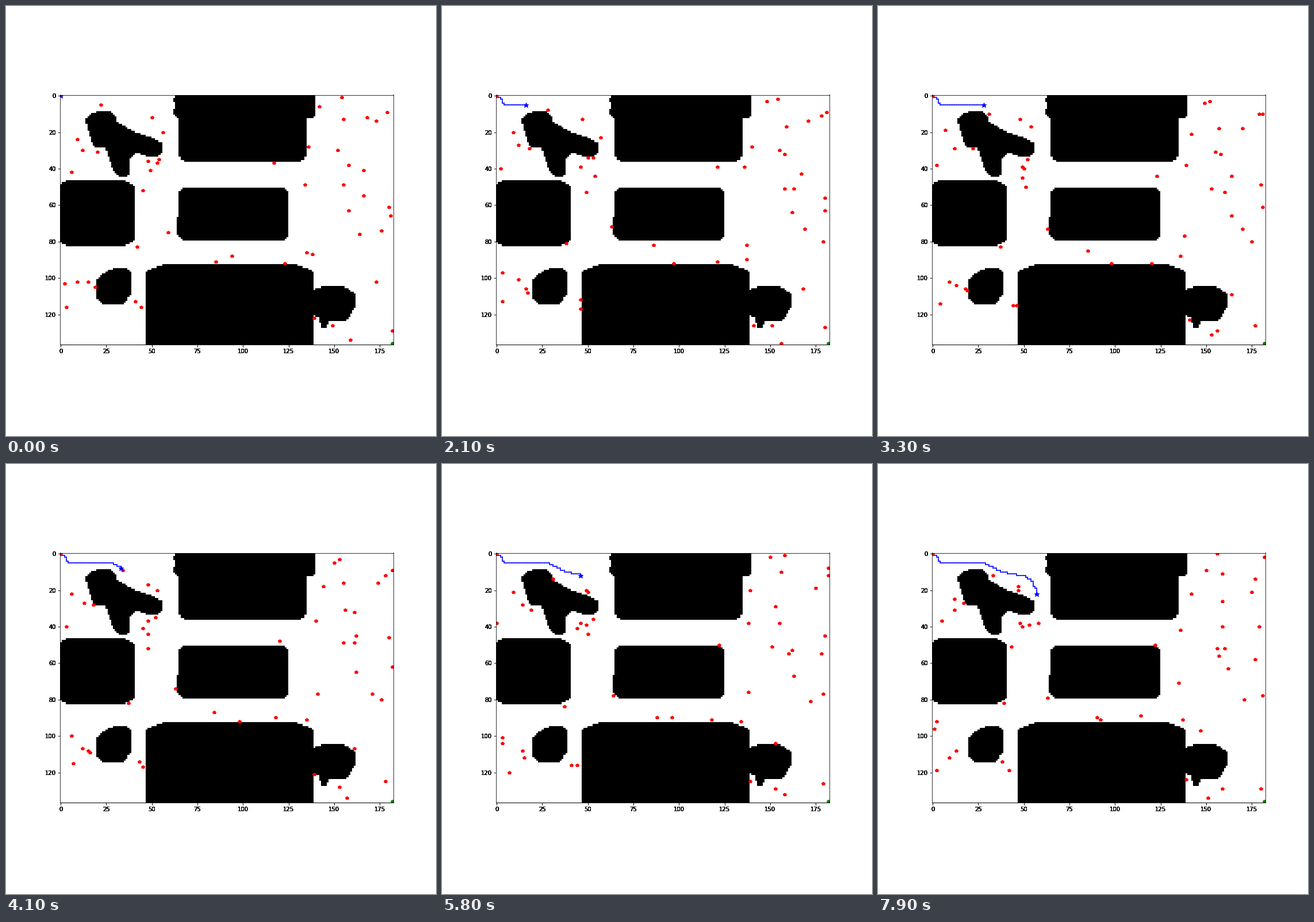
A matplotlib script that plays this animation: 748x748 px, repeating every 8000 ms.

```python
import numpy as np
import matplotlib.pyplot as plt
from matplotlib.animation import FuncAnimation
from matplotlib.path import Path

SIZE, DPI = 748, 72
COLS, ROWS = 183, 137
FRAMES, STEP_MS = 80, 100
BOX = np.array([93.6, 159.05, 580.32, 434.45]) / SIZE

# Rounded rooms: x0, y0, x1, y1, then the corner's width and height
ROOMS = [(63, -9, 140, 13, 2, 1), (65, -9, 135, 37, 4, 4),
         (62, 2, 63, 4), (62, 8, 63, 11),
         (-2, 47, 41, 83, 8, 4),
         (65, 51, 125, 80, 3, 3), (64, 67, 65, 77),
         (47, 93, 139, 145, 13, 5)]

# Irregular obstacles as outlines
PLANE = [(17, 10), (23, 9), (28, 9), (31, 13), (31, 15), (40, 20), (50, 23.5),
         (56, 26.5), (56, 31), (54, 34), (48, 34), (43, 32), (41, 32), (38, 35),
         (38, 43), (36, 45), (32, 45), (29, 41.5), (25, 29), (19, 29), (17, 25),
         (14, 14)]
DRUM = [(20, 102), (24, 98), (27, 96), (32, 95), (37, 95), (39, 98), (39, 109),
        (35, 115), (24, 115), (20, 111)]
BLOB = [(138, 107), (145, 105), (155, 105), (162, 109), (162, 116), (157, 124),
        (147, 124), (146, 128), (143, 128), (142, 122), (138, 121)]

# Cells where the walkers begin
STARTS = [(22, 5), (50, 12), (56, 20), (9, 24), (12, 30), (20, 31), (6, 42),
          (48, 36), (53, 37), (54, 35), (49, 41), (45, 52), (59, 75), (42, 83),
          (2, 103), (9, 102), (15, 102), (19, 105), (3, 116), (41, 113),
          (44, 116), (85, 91), (94, 88), (123, 92), (117, 37), (142, 6),
          (154, 1), (155, 13), (168, 12), (173, 14), (179, 9), (136, 28),
          (152, 30), (158, 38), (166, 41), (134, 49), (155, 49), (166, 55),
          (158, 63), (164, 76), (180, 61), (181, 66), (176, 74), (135, 86),
          (138, 87), (173, 102), (139, 122), (149, 126), (159, 134), (182, 129)]

# The robot's route: lengths of its runs, in turn down and right
RUNS = ([1, 2, 1, 1, 2, 1, 1, 25] + 4 * [1, 2]
        + [1, 4, 1, 5, 1, 5, 1, 1, 1, 2, 1, 1, 3, 1, 1, 1, 3])


def room(x, y, x0, y0, x1, y1, rx=0.5, ry=0.5):
    dx = np.maximum(0, np.maximum(x0 + rx - x, x - x1 + rx)) / rx
    dy = np.maximum(0, np.maximum(y0 + ry - y, y - y1 + ry)) / ry
    return dx ** 1.5 + dy ** 1.5 <= 1


def build_map():
    x, y = np.meshgrid(np.arange(COLS) + 0.5, np.arange(ROWS) + 0.5)
    blocked = np.zeros((ROWS, COLS), bool)
    for shape in ROOMS:
        blocked |= room(x, y, *shape)
    centres = np.column_stack([x.ravel(), y.ravel()])
    for outline in (PLANE, DRUM, BLOB):
        inside = Path(outline + outline[:1]).contains_points(centres)
        blocked |= inside.reshape(ROWS, COLS)
    return blocked


def wander(starts, blocked, rng):
    """Each walker steps to a random neighbouring cell, if that is free."""
    track = [np.array(starts)]
    for _ in range(FRAMES - 1):
        here = track[-1]
        there = here + rng.integers(-1, 2, here.shape)
        there = np.clip(there, 0, (COLS - 1, ROWS - 1))
        wall = blocked[there[:, 1], there[:, 0]]
        track.append(np.where(wall[:, None], here, there))
    return np.array(track)


def follow(runs):
    steps = [(i % 2, 1 - i % 2) for i, n in enumerate(runs) for _ in range(n)]
    return np.cumsum([(0, 0)] + steps, axis=0)


blocked = build_map()
tracks = wander(STARTS, blocked, np.random.default_rng(7))
route = follow(RUNS)

fig = plt.figure(figsize=(SIZE / DPI, SIZE / DPI), dpi=DPI, facecolor="white")


def add_axes():
    ax = fig.add_axes(BOX, facecolor="none")
    ax.set(xlim=(-0.5, COLS - 0.5), ylim=(ROWS - 0.5, -0.5),
           xticks=range(0, 176, 25), yticks=range(0, 121, 20))
    return ax


# Stacked axes give the tick labels their heavy look
for _ in range(6):
    add_axes()
ax = add_axes()
ax.imshow(~blocked, cmap="gray", vmin=0, vmax=1, aspect="auto",
          interpolation="nearest")

# Separate segments, so that their caps overlap at every cell
trail = [ax.plot(*route[i:i + 2].T, color="blue", lw=1.5)[0]
         for i in range(len(route) - 1)]
ax.plot(0, 0, "p", color="red")
ax.plot(COLS - 1, ROWS - 1, "p", color="green")
dots, = ax.plot([], [], "p", color="red", ls="none", zorder=2.1)
robot, = ax.plot([], [], "*", color="blue", ms=9, zorder=2.2)


def draw(frame):
    dots.set_data(*tracks[frame].T)
    robot.set_data(*route[frame:frame + 1].T)
    for i, segment in enumerate(trail):
        segment.set_visible(i < frame)
    return [dots, robot, *trail]


anim = FuncAnimation(fig, draw, frames=FRAMES, interval=STEP_MS, repeat=True,
                     repeat_delay=0)
plt.show()
```
